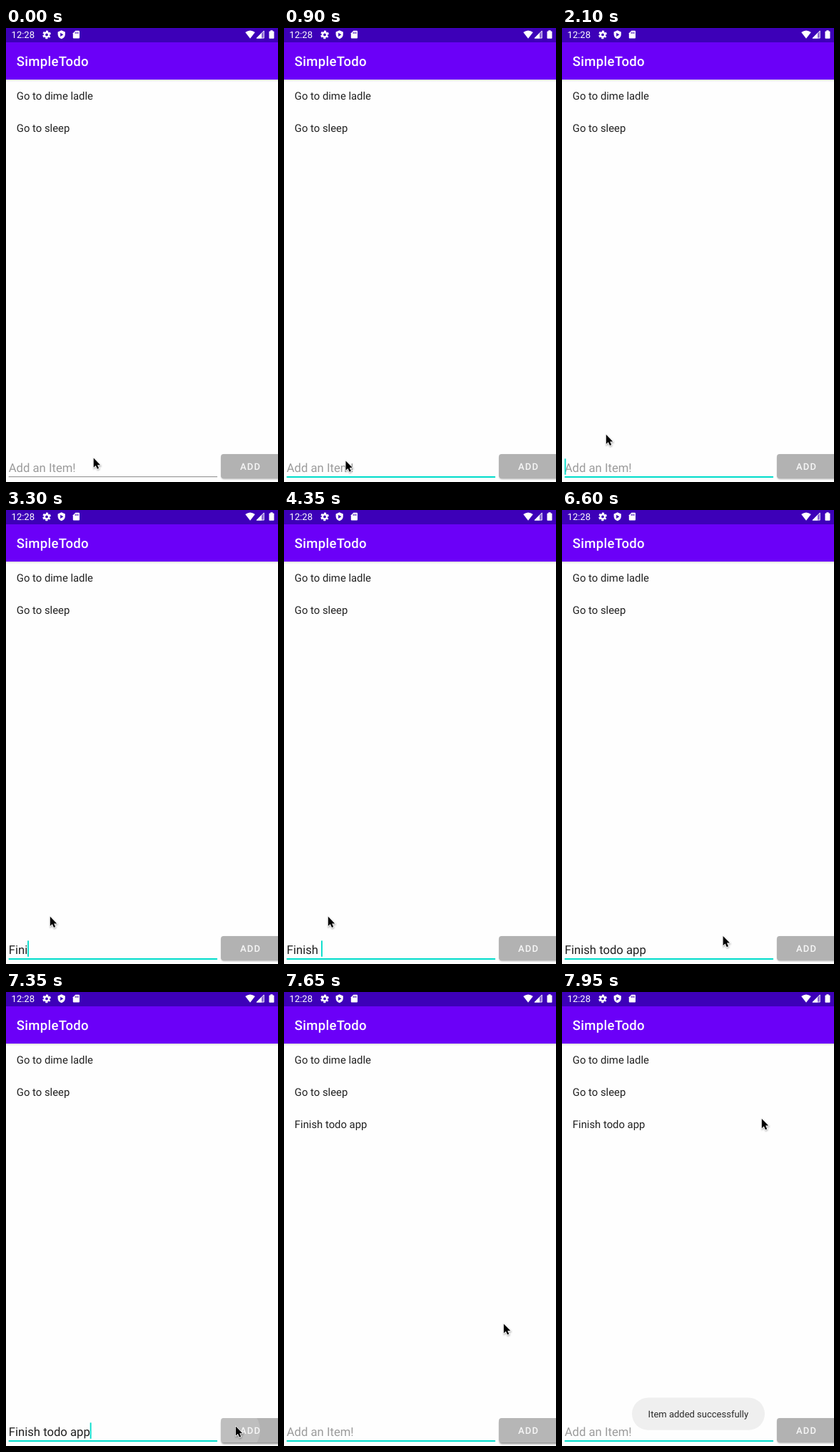
These frames come from a looping animation (381 by 634 pixels, 8000 ms). An HTML page:

```html
<!DOCTYPE html>
<html lang="en">
<head>
<meta charset="utf-8">
<title>SimpleTodo</title>
<style>
  html, body { margin: 0; width: 100%; height: 100%; overflow: hidden; background: #fefefe; }
  svg { display: block; width: 100vw; height: 100vh; }
  text { font-family: Roboto, sans-serif; white-space: pre; text-rendering: geometricPrecision; }
  .item { font-size: 14.83px; fill: #212121; }
  .field { font-size: 16.68px; fill: #212121; }
  .hint { fill: #9b9b9b; }
  .title { font-size: 18.54px; font-weight: 500; letter-spacing: .3px; fill: #fff; }
  .small { font-size: 13px; }
  .button { font-size: 13px; font-weight: 500; letter-spacing: 1.16px; fill: #f7f7f7; }
</style>
</head>
<body>
<svg viewBox="0 0 381 634">
  <defs>
    <linearGradient id="drop" x2="0" y2="1">
      <stop offset="0" stop-color="#000" stop-opacity=".14"/>
      <stop offset="1" stop-color="#000" stop-opacity="0"/>
    </linearGradient>
    <filter id="blur" x="-20%" y="-30%" width="140%" height="160%"><feGaussianBlur stdDeviation="1"/></filter>
    <clipPath id="face"><rect x="301" y="595" width="84" height="34" rx="3.7"/></clipPath>
    <path id="arrow" d="M0 0V13.2L3 10.4L5.2 15.2L7.4 14.2L5.3 9.6H9.4Z"/>
  </defs>

  <rect width="381" height="634" fill="#fefefe"/>
  <rect y="72" width="381" height="3" fill="url(#drop)"/>
  <rect y="20" width="381" height="52" fill="#6b00f8"/>
  <rect width="381" height="20" fill="#3d00b8"/>

  <g fill="#fff">
    <text class="small" x="7.6" y="14.4">12:28</text>
    <g fill="none" stroke="#fff">
      <circle cx="57" cy="9.4" r="3.1" stroke-width="2.5"/>
      <circle cx="57" cy="9.4" r="4.9" stroke-width="1.9" stroke-dasharray="2.9 2.23" stroke-dashoffset="1.45" transform="rotate(30 57 9.4)"/>
    </g>
    <path d="M77.7 3.3L82.8 5.4V9C82.8 12 80.7 14.4 77.7 15.3C74.7 14.4 72.6 12 72.6 9V5.4Z"/>
    <path d="M76.1 6.7L80.4 9.3L76.1 11.9Z" fill="#3d00b8"/>
    <path d="M97.3 3.8H102Q103 3.8 103 4.8V13.6Q103 14.6 102 14.6H94.8Q93.8 14.6 93.8 13.6V7.3Z"/>
    <path d="M97.2 5.6v2.3M99.1 5.6v2.3M101 5.6v2.3" stroke="#3d00b8"/>
    <path d="M342 14.8L335.2 6Q342 .8 348.8 6Z"/>
    <path d="M361.7 3.2V14.4H350.5Z" opacity=".4"/>
    <path d="M358 6.9V14.4H350.5Z"/>
    <path d="M361.3 4V14H351.4Z" fill="none" stroke="#fff" stroke-width=".8"/>
    <path d="M370.4 3.2H373.6V4.4H374.8Q375.5 4.4 375.5 5.1V13.9Q375.5 14.7 374.8 14.7H369.2Q368.5 14.7 368.5 13.9V5.1Q368.5 4.4 369.2 4.4H370.4Z"/>
  </g>
  <text class="title" x="14.8" y="53.4">SimpleTodo</text>

  <text class="item" x="14.83" y="100.4">Go to dime ladle</text>
  <text class="item" x="14.83" y="145.1">Go to sleep</text>
  <text class="item" id="added" x="14.83" y="189.8">Finish todo app</text>

  <text class="field" id="field" x="3.7" y="619.7" xml:space="preserve"></text>
  <rect id="line" x="3.7" width="292.3"/>
  <rect id="caret" y="601.4" width="1.85" height="22.4" fill="#00dccb"/>

  <rect id="shade" x="301.6" width="90" height="33.6" rx="4" filter="url(#blur)"/>
  <g clip-path="url(#face)">
    <rect x="301" y="595" width="84" height="34" fill="#b2b2b2"/>
    <circle id="ripple" cx="322" cy="612" fill="#fff"/>
  </g>
  <text class="button" x="328" y="616.9">ADD</text>

  <g id="toast">
    <rect x="98" y="566.4" width="186" height="45.4" rx="22.7" fill="#efefef"/>
    <text class="small" x="120.6" y="594.2" fill="#2b2b2b">Item added successfully</text>
  </g>

  <g id="mouse">
    <use href="#arrow" x=".5" y="1.4" stroke="#000" stroke-width="1.6" opacity=".3" filter="url(#blur)"/>
    <use href="#arrow" stroke="#fff" stroke-width="1.6" stroke-linejoin="round" paint-order="stroke"/>
  </g>
</svg>
<script>
const LOOP = 8000, TICK = 150, BLINK = 500;
const FOCUS = 900, PRESS = 7350, SAVE = 7650;

// Bursts of typing, one letter per tick
const bursts = [[2350, 'F'], [3000, 'ini'], [3900, 'sh'], [4350, ' '], [4650, 'to'], [5100, 'do '], [5700, 'app']];
const keys = bursts.flatMap(([start, text]) =>
  [...text].map((letter, i) => ({ letter, at: start + i * TICK })));

// Pointer glides: start, end, x, y
const home = [122.7, 600.6];
const glides = [
  [0, 150, 125.4, 596.5],
  [300, 600, 86.5, 604.5],
  [1200, 1500, 61.8, 567.8],
  [6150, 6600, 225.6, 595],
  [6600, 7050, 321.8, 606.6],
  [7500, 7950, 279.8, 177]
];

const el = id => document.getElementById(id);
const clamp = v => Math.min(1, Math.max(0, v));
const set = (node, attrs) => {
  for (const name in attrs) node.setAttribute(name, attrs[name]);
};
const show = (node, on) => set(node, { opacity: Number(on) });
const [added, field, line, caret, shade, ripple, toast, mouse] =
  ['added', 'field', 'line', 'caret', 'shade', 'ripple', 'toast', 'mouse'].map(el);

function drawField(t) {
  const hit = keys.filter(k => k.at <= t);
  const typed = t < SAVE ? hit.map(k => k.letter).join('') : '';
  field.textContent = typed || 'Add an Item!';
  field.classList.toggle('hint', !typed);

  // The caret blink restarts with each key
  const idle = t - (hit.length ? hit[hit.length - 1].at : FOCUS + 100);
  set(caret, { x: 3.6 + (typed ? field.getComputedTextLength() : 0) });
  show(caret, idle >= 0 && idle % (2 * BLINK) < BLINK);

  set(line, t >= FOCUS
    ? { y: 626, height: 2, fill: '#00dccb' }
    : { y: 626.2, height: 1, fill: '#868686' });
  show(added, t >= SAVE);
}

function drawButton(t) {
  const age = t - PRESS;
  const pressed = age >= 0 && age < 450;
  set(ripple, { r: pressed ? 34 + age * 0.2 : 0, opacity: 0.16 * clamp(1 - age / 450) });
  set(shade, { y: pressed ? 597.6 : 596.4, opacity: pressed ? 0.4 : 0.3 });
  show(toast, clamp((t - SAVE) / 300));
}

function drawMouse(t) {
  let [x, y] = home;
  for (const [start, end, toX, toY] of glides) {
    const p = clamp((t - start) / (end - start));
    x += (toX - x) * p;
    y += (toY - y) * p;
  }
  set(mouse, { transform: `translate(${x} ${y})` });
}

let last = -1;
function frame() {
  const t = Math.floor(performance.now() % LOOP / TICK) * TICK;
  if (t !== last) {
    last = t;
    drawField(t);
    drawButton(t);
    drawMouse(t);
  }
  requestAnimationFrame(frame);
}
frame();
</script>
</body>
</html>
```
